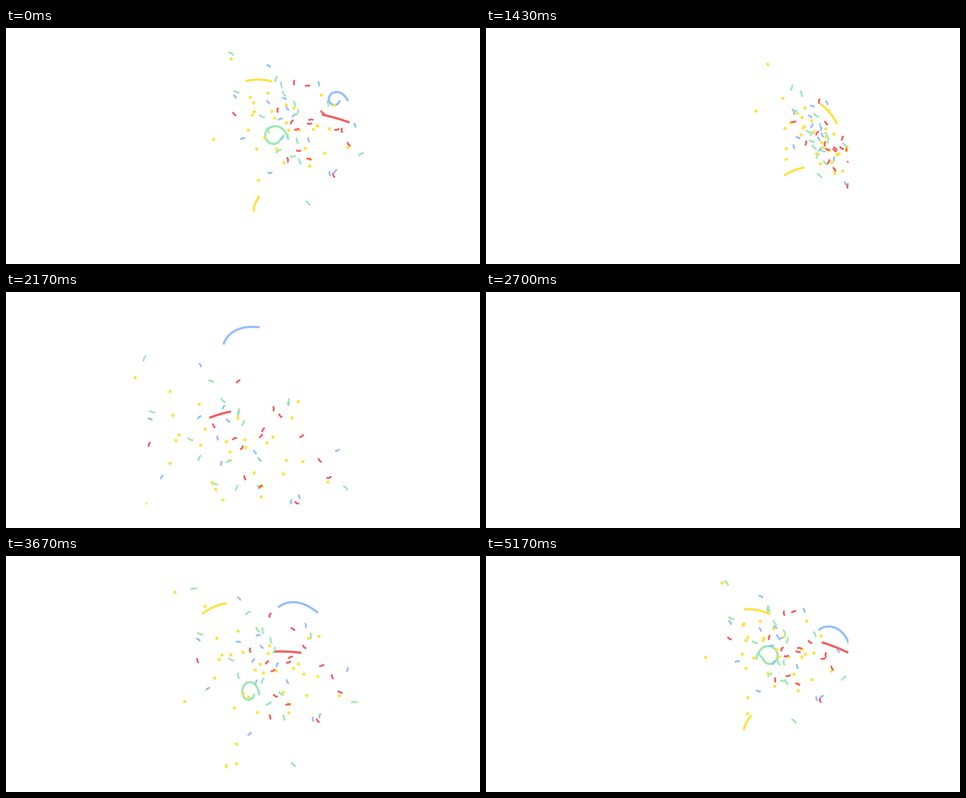
These frames come from a looping animation (1058x529 px, 5.21 s). An HTML page with a canvas:

```html
<!DOCTYPE html>
<html lang="en">
<head>
<meta charset="utf-8">
<title>Confetti</title>
<style>
  html, body { margin: 0; width: 100%; height: 100%; overflow: hidden; background: #fff; }
  canvas { display: block; }
</style>
</head>
<body>
<canvas id="stage" width="1058" height="529"></canvas>
<script>
const ctx = document.getElementById('stage').getContext('2d');
const LOOP = 5210, FRAMES = 156, CYCLE = 157 / 3;
const YELLOW = '#fde243', RED = '#f75c5c', BLUE = '#94bfff', GREEN = '#9fe8b5';
const RAD = Math.PI / 180;

let seed = 7;
function random() {
  seed = (seed * 16807) % 2147483647;
  return seed / 2147483647;
}
const spread = () => (random() + random() - 1) * Math.sqrt(6);

// Ages count frames; age 0 is when the cloud hangs in mid-air.
const damped = (age, drag) => (1 - Math.exp(-drag * age)) / drag;
const fall = age => 1.4 * (age - damped(age, 0.02)) / 0.02;

// Two puffs leave from beyond the right edge, so speed follows from position.
const widePuff = {
  counts: { green: 5, star: 15, blue: 4, red: 5 },
  place() {
    return [635 + 105 * spread(), 235 + 88 * spread()];
  },
  speed: (x, y) => [0.031 * (x - 890), 1.8 + 0.033 * (y - 149) - 0.0233 * (x - 780)],
};
const densePuff = {
  counts: { green: 12, star: 19, blue: 11, red: 12 },
  place() {
    const x = 632 + 64 * spread();
    return [x, 205 + 0.45 * (x - 632) + 45 * spread()];
  },
  speed: (x, y) => [0.043 * (x - 900), -1.2 + 0.041 * (y - 102) - 0.028 * (x - 605)],
};

const kinds = {
  green: { color: GREEN, shape: () => dash(14) },
  star: { color: YELLOW, shape: star },
  blue: { color: BLUE, shape: () => dash(10.5) },
  red: { color: RED, shape: () => dash(11) },
};

function makePieces({ counts, place, speed }) {
  return Object.keys(counts).flatMap(kind => Array.from({ length: counts[kind] }, () => {
    const [x, y] = place();
    return {
      kind: kinds[kind], x, y, speed: speed(x, y),
      angle: 360 * random(), spin: 16 * (random() - 0.5),
    };
  }));
}
const pieces = [widePuff, densePuff].flatMap(makePieces);

// A ribbon turns by `bend` degrees along its length, tighter towards its end for
// curl > 1; `fold` is [turn, rate] of a slow flip that foreshortens it.
const ribbons = [
  { color: YELLOW, life: [-12, 9], at: [565, 118], drift: [-20, -2.5],
    length: 60, tilt: 1, spin: -5, start: -15, bend: 30, curl: 1, loosen: 0, fold: [0, 0] },
  { color: YELLOW, life: [-14, 26], at: [558, 397], drift: [-13, 12.5],
    length: 50, tilt: -72, spin: -5, start: -13, bend: 26, curl: 1, loosen: 0, fold: [0.9, 0.09] },
  { color: RED, life: [-26, 21], at: [736, 203], drift: [-21.5, 0],
    length: 64, tilt: 16, spin: -2.7, start: -4, bend: 8, curl: 1, loosen: 0, fold: [0, 0.055] },
  { color: BLUE, life: [-26, 17], at: [742, 158], drift: [-18, -11],
    length: 98, tilt: -118, spin: -4.8, start: 0, bend: -330, curl: 1.6, loosen: 0.76, fold: [0, 0] },
  { color: GREEN, life: [-8, 8], at: [604, 240], drift: [-11.5, 10],
    length: 132, tilt: 0, spin: 0, start: -100, bend: -340, curl: 1.35, loosen: 0, fold: [0, 1.4] },
];

function star() {
  ctx.beginPath();
  for (let i = 0; i < 8; i++) {
    const r = i % 2 ? 3 : 5, a = i * Math.PI / 4;
    ctx.lineTo(r * Math.cos(a), r * Math.sin(a));
  }
  ctx.fill();
}

function dash(length) {
  const h = length / 2;
  ctx.lineWidth = 4;
  ctx.beginPath();
  ctx.moveTo(-h, 1);
  ctx.quadraticCurveTo(0, -2.5, h, 1);
  ctx.stroke();
}

function drawPiece({ kind, x, y, speed, angle, spin }, age) {
  ctx.save();
  ctx.translate(x + speed[0] * damped(age, 0.01), y + speed[1] * damped(age, 0.02) + fall(age));
  ctx.rotate((angle + spin * age) * RAD);
  ctx.fillStyle = ctx.strokeStyle = kind.color;
  kind.shape();
  ctx.restore();
}

function middle(values) {
  return (Math.min(...values) + Math.max(...values)) / 2;
}

function drawRibbon(ribbon, age) {
  if (age < ribbon.life[0] || age > ribbon.life[1]) return;
  const { at, drift, length, tilt, spin, start, bend, curl, loosen, fold } = ribbon;
  const steps = 40;
  const turn = bend * (1 - loosen * (1 - Math.exp(-age * age / 2)));
  const squeeze = Math.cos(fold[0] + fold[1] * age);
  const cos = Math.cos((tilt + spin * age) * RAD), sin = Math.sin((tilt + spin * age) * RAD);
  const xs = [0], ys = [0];
  for (let i = 0; i < steps; i++) {
    const heading = (start + turn * ((i + 0.5) / steps) ** curl) * RAD;
    const dx = Math.cos(heading) * length / steps * squeeze;
    const dy = Math.sin(heading) * length / steps;
    xs.push(xs[i] + dx * cos - dy * sin);
    ys.push(ys[i] + dx * sin + dy * cos);
  }
  const left = at[0] + drift[0] * age - middle(xs);
  const top = at[1] + drift[1] * age + age * age / 2 - middle(ys);
  ctx.strokeStyle = ribbon.color;
  ctx.lineWidth = 5;
  ctx.beginPath();
  xs.forEach((x, i) => ctx.lineTo(left + x, top + ys[i]));
  ctx.stroke();
}

function draw(now) {
  const frame = Math.min(FRAMES - 1, Math.floor((now % LOOP) / LOOP * FRAMES + 0.35));
  ctx.clearRect(0, 0, 1058, 529);
  ctx.save();
  ctx.beginPath();
  ctx.rect(249, 53, 560, 423);
  ctx.clip();
  for (let n = 0; n < 4; n++) {
    const age = frame - Math.ceil(n * CYCLE - 1e-6);
    if (Math.abs(age) > 26) continue;
    ribbons.forEach(ribbon => drawRibbon(ribbon, age));
    pieces.forEach(piece => drawPiece(piece, age));
  }
  ctx.restore();
}

const began = performance.now();
function tick() {
  draw(performance.now() - began);
  requestAnimationFrame(tick);
}
tick();
</script>
</body>
</html>
```
